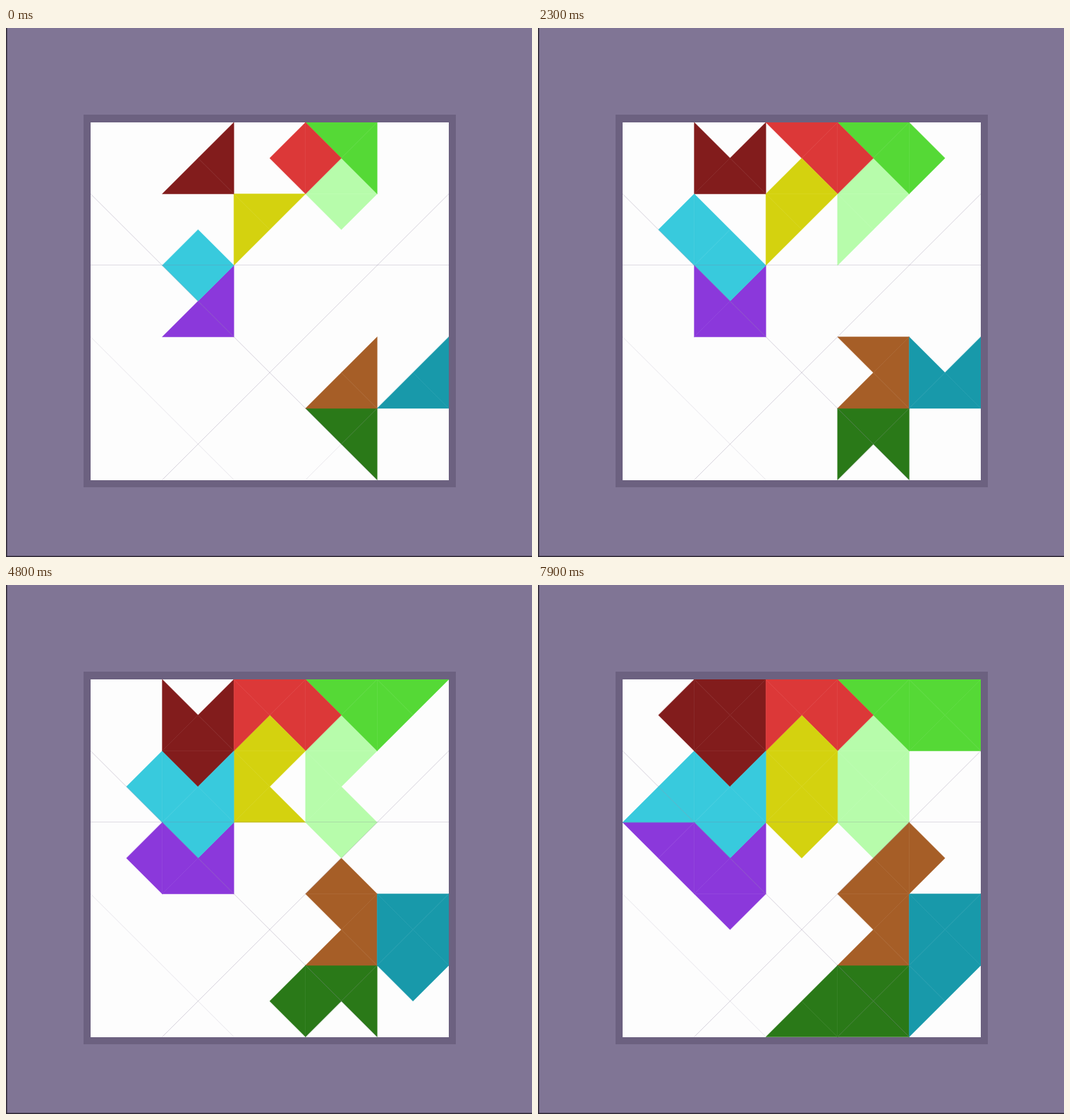
Recreate the animation shown at these times as an HTML page with a canvas. Size 746 by 751 pixels, loop 8 s.

```html
<!DOCTYPE html>
<html>
<head>
<meta charset="utf-8">
<style>
  html, body { margin: 0; width: 746px; height: 751px; overflow: hidden; background: #807595; }
  canvas { display: block; }
</style>
</head>
<body>
<canvas id="stage" width="746" height="751"></canvas>
<script>
const ctx = document.getElementById('stage').getContext('2d');
const LOOP = 8000, STEP = 204, LEAD = 35;
const LEFT = 120, TOP = 134, SIZE = 508, CELL = 101.5;

// Triangles as column, row, side, in the order each colour claims them.
// Colours take turns in this order; two triangles each are given at the start.
const players = Object.entries({
  '#38cadd': '11b 12t 11l 01r 11r 01b',
  '#b7fcab': '30b 31t 31l 31b 32t 31r',
  '#1899aa': '43r 43b 43l 43t 44t 44l',
  '#2a7918': '34t 34r 34l 24r 24b 34b',
  '#55d936': '30t 30r 40l 40t 40r 40b',
  '#dc3838': '20r 30l 20t 20l',
  '#d4d20f': '21l 21t 20b 21b 21r 22t',
  '#8b38db': '12r 12b 12l 02r 02t 13t',
  '#a65e27': '33r 33b 33t 32b 32r 42l',
  '#821c1c': '10r 10b 10l 11t 10t 00r'
}).map(([color, list]) => ({ color, list: list.split(' ') }));

const moves = [];
for (let round = 0; round < 6; round++)
  for (const { color, list } of players)
    if (list[round]) moves.push([color, list[round]]);
const START = players.length * 2;

// Corners of each side, in cell units.
const sides = { t: [0, 0, 1, 0], r: [1, 0, 1, 1], b: [1, 1, 0, 1], l: [0, 1, 0, 0] };

// Faint seams in grid units, with opacity.
const seams = [
  [0, 1, 4, 5, .4], [5, 1, 1, 5, .4],
  [0, 3, 2, 5, .22], [3, 5, 4, 4, .2]
];

const px = c => LEFT + c * (CELL + .1);
const py = r => TOP + r * CELL;

function rect(color, x, y, w, h) {
  ctx.fillStyle = color;
  ctx.fillRect(x, y, w, h);
}

function triangle(color, [col, row, side]) {
  const [x1, y1, x2, y2] = sides[side];
  const x = +col, y = +row;
  ctx.beginPath();
  ctx.moveTo(px(x + x1), py(y + y1));
  ctx.lineTo(px(x + x2), py(y + y2));
  ctx.lineTo(px(x + .5), py(y + .5));
  ctx.closePath();
  ctx.fillStyle = ctx.strokeStyle = color;
  ctx.lineWidth = .5;
  ctx.fill();
  ctx.stroke();
}

function draw(t) {
  rect('#807595', 0, 0, 746, 751);
  rect('#2a2430', 0, 0, 1.5, 751);
  rect('#2a2430', 0, 749.5, 746, 1.5);
  rect('#6c6180', 110, 123, 528, 529);
  rect('#fdfdfd', LEFT, TOP, SIZE, SIZE);

  const count = START + Math.floor((t + LEAD) / STEP);
  ctx.save();
  ctx.beginPath();
  ctx.rect(LEFT, TOP, SIZE, SIZE);
  ctx.clip();
  for (const [color, tri] of moves.slice(0, count)) triangle(color, tri);

  ctx.strokeStyle = '#807595';
  ctx.lineWidth = .8;
  for (const [x1, y1, x2, y2, alpha] of seams) {
    ctx.globalAlpha = alpha;
    ctx.beginPath();
    ctx.moveTo(px(x1), py(y1));
    ctx.lineTo(px(x2), py(y2));
    ctx.stroke();
  }
  ctx.globalAlpha = .25;
  rect('#807595', LEFT, 336, SIZE, 1);
  ctx.restore();
}

const began = performance.now();
function tick() {
  draw((performance.now() - began) % LOOP);
  requestAnimationFrame(tick);
}
tick();
</script>
</body>
</html>
```
